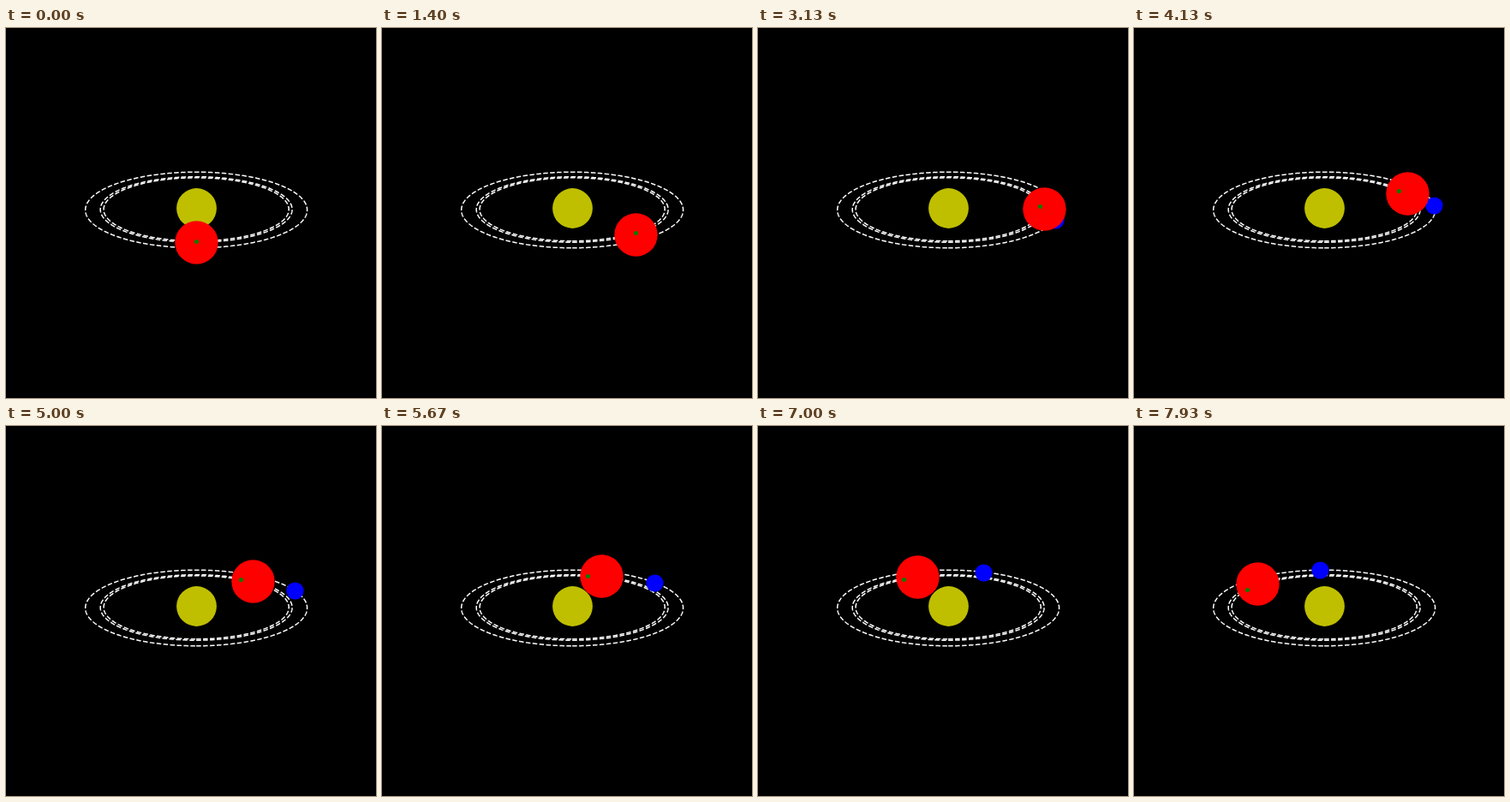
Write an HTML page with a canvas that moves like this. It is 432 px wide and 432 px high and loops after 8000 ms.

```html
<!DOCTYPE html>
<html lang="en">
<head>
<meta charset="utf-8">
<title>Orbits</title>
<style>
  html, body { margin: 0; height: 100%; overflow: hidden; background: #000; }
  canvas { display: block; width: 100vw; height: 100vh; }
</style>
</head>
<body>
<canvas id="stage" width="432" height="432"></canvas>
<script>
const ctx = document.getElementById("stage").getContext("2d");
const LOOP = 8000;
const CENTER = { x: 222.15, y: 210.2 };
const TILT = 0.3415;         // vertical squash of the orbital plane
const PERSPECTIVE = 0.0004;  // per pixel of orbit radius

// speed is in degrees per step, at 15 steps per second
const planets = [
  { orbit: 129.3, speed: 1.529, size: 10.1, color: "#00f" },
  { orbit: 111.85, speed: 1.899, size: 25.2, color: "#f00" },
  { orbit: 108, speed: 2, size: 2.5, color: "#008000" }
];

// Angle 0 is the point nearest the viewer; angles grow to the right.
function project(radius, angle) {
  const scale = radius / (1 - PERSPECTIVE * radius * Math.cos(angle));
  return {
    x: CENTER.x + scale * Math.sin(angle),
    y: CENTER.y + scale * TILT * Math.cos(angle)
  };
}

function drawOrbit(radius) {
  const points = 360;
  ctx.beginPath();
  for (let i = 0; i <= points; i++) {
    const p = project(radius, i / points * 2 * Math.PI);
    ctx.lineTo(p.x, p.y);
  }
  ctx.stroke();
}

// Discs sit on pixel centres.
function drawDisc({ x, y }, size, color) {
  ctx.fillStyle = color;
  ctx.beginPath();
  ctx.arc(Math.floor(x) + 0.5, Math.round(y) + 0.5, size, 0, 2 * Math.PI);
  ctx.fill();
}

function draw(time) {
  const step = Math.floor((Math.floor(time / 10) + 0.5) * 0.15);
  ctx.fillStyle = "#000";
  ctx.fillRect(0, 0, 432, 432);

  ctx.strokeStyle = "#fff";
  ctx.lineWidth = 1.5;
  ctx.setLineDash([5.55, 2.4]);
  planets.forEach(p => drawOrbit(p.orbit));

  drawDisc(CENTER, 23.4, "#bfbf00");
  for (const p of planets) {
    drawDisc(project(p.orbit, step * p.speed * Math.PI / 180), p.size, p.color);
  }
}

const start = performance.now();
function tick() {
  draw((performance.now() - start) % LOOP);
  requestAnimationFrame(tick);
}
tick();
</script>
</body>
</html>
```
